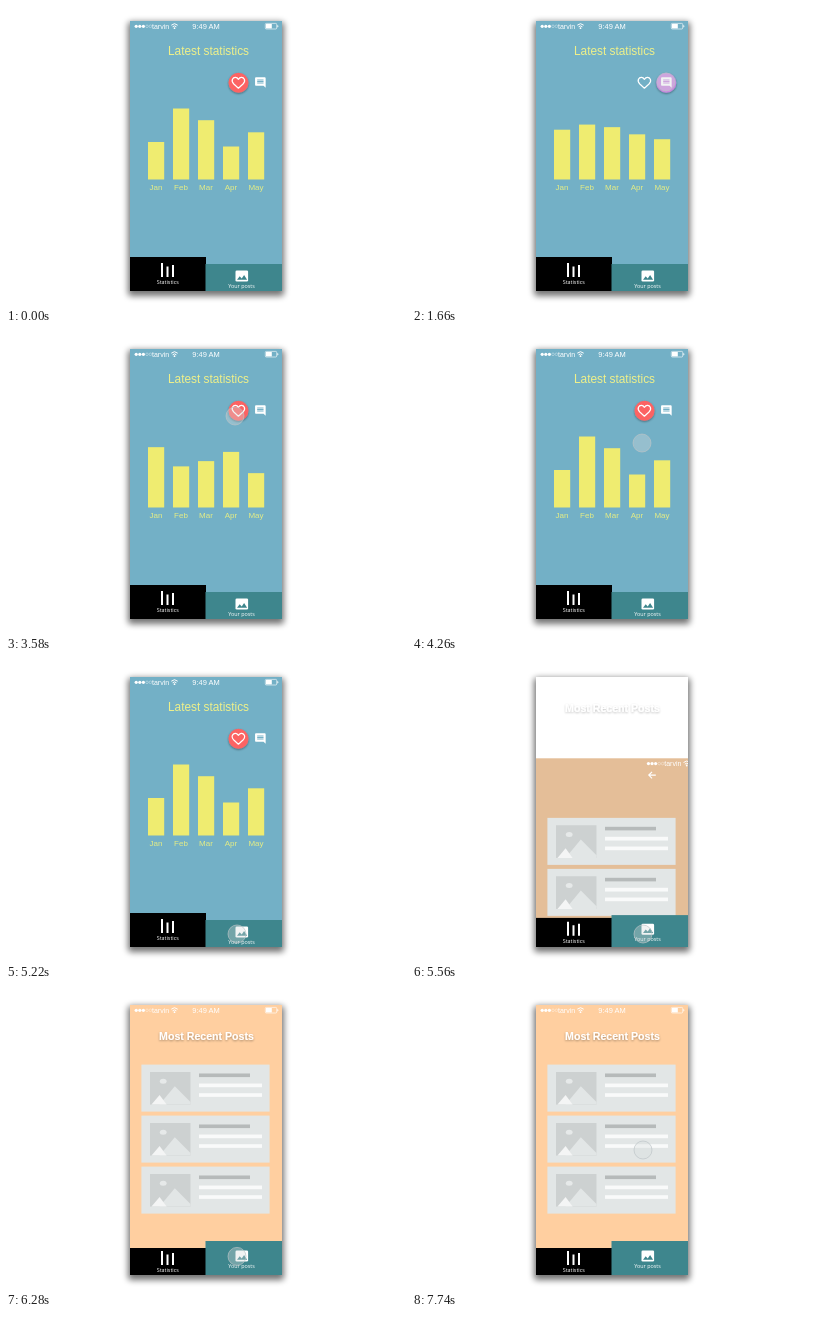
An HTML page for the animation above (8000 ms loop, 400 by 300 pixels).

```html
<!DOCTYPE html>
<html lang="en">
<head>
<meta charset="utf-8">
<title>Statistics app</title>
<style>
  html, body { margin: 0; width: 100%; height: 100%; overflow: hidden; background: #fff; }
  svg { display: block; width: 400px; height: 300px; }
  text { font-family: "Liberation Sans", Arial, sans-serif; }
  .tab text { font: 5.4px "Open Sans", "Noto Sans", sans-serif; fill: #fff; text-anchor: middle; }
  .label { font-size: 8px; fill: #e3ec86; text-anchor: middle; }
  .mid { text-anchor: middle; }
</style>
</head>
<body>
<svg viewBox="0 0 400 300">
  <defs>
    <clipPath id="screen"><rect x="124" y="15" width="152" height="270"/></clipPath>
    <filter id="blur" x="-20%" y="-20%" width="140%" height="140%"><feGaussianBlur stdDeviation="3.4"/></filter>
    <filter id="soft" x="-50%" y="-50%" width="200%" height="200%">
      <feDropShadow dx="0" dy="1" stdDeviation="1" flood-color="#000" flood-opacity=".4"/>
    </filter>

    <g id="status" fill="#fff">
      <circle cx="130.2" cy="20.3" r="1.6"/>
      <circle cx="133.8" cy="20.3" r="1.6"/>
      <circle cx="137.4" cy="20.3" r="1.6"/>
      <g fill="none" stroke="#fff" stroke-width=".5" opacity=".7">
        <circle cx="141" cy="20.3" r="1.3"/>
        <circle cx="144.4" cy="20.3" r="1.3"/>
      </g>
      <text x="146" y="22.7" font-size="7">tarvin</text>
      <g fill="none" stroke="#fff" stroke-width="1">
        <path d="M165.3 19.2q3.2-3 6.4 0M166.6 20.8q1.9-1.8 3.8 0"/>
      </g>
      <circle cx="168.5" cy="22.2" r=".9"/>
      <text x="200" y="22.9" font-size="7.5" class="mid">9:49 AM</text>
      <rect x="259.3" y="17.4" width="11.4" height="5.6" rx="1" fill="none" stroke="#fff" stroke-width=".6"/>
      <rect x="260" y="18" width="5.8" height="4.4"/>
      <path d="M271.4 19v2.4q1-.3 1-1.2t-1-1.2z"/>
    </g>

    <g id="card">
      <rect x="135.4" y="74.6" width="128.2" height="47" fill="#e2e6e6"/>
      <rect x="144" y="82" width="40.5" height="32.6" fill="#cdd1d1"/>
      <ellipse cx="157.2" cy="91.3" rx="3.4" ry="2.5" fill="#e6e9e9"/>
      <path d="M153.5 114.6L168.8 96.2 184.5 112v2.6z" fill="#e2e6e6"/>
      <path d="M145.5 114.6L153.6 105l7 9.6z" fill="#f4f5f5"/>
      <rect x="193" y="83.5" width="51" height="3.6" fill="#b6baba"/>
      <rect x="193" y="93.5" width="63" height="3.7" fill="#f9fafa"/>
      <rect x="193" y="103.2" width="63" height="3.7" fill="#f9fafa"/>
    </g>
  </defs>

  <rect width="400" height="300" fill="#fff"/>
  <rect x="122" y="16" width="156" height="274" rx="3" fill="#000" opacity=".55" filter="url(#blur)"/>

  <g clip-path="url(#screen)">
    <rect x="124" y="15" width="152" height="270" fill="#fff"/>

    <g id="stats">
      <rect x="124" y="15" width="152" height="270" fill="#73b0c6"/>
      <use href="#status"/>
      <text x="202.5" y="49" font-size="11.85" fill="#eef08a" class="mid">Latest statistics</text>
      <g id="chart"></g>
      <circle id="likeDisc" cx="232.5" cy="76.8" r="10" fill="#fc6464" filter="url(#soft)"/>
      <circle id="talkDisc" cx="254.3" cy="76.8" r="10" fill="#c987df" filter="url(#soft)"/>
      <path d="M232.4 82.2L227.8 78C224.3 74.6 227.2 71.2 229.5 71.4 231 71.5 231.8 72.4 232.4 73.3 233 72.4 233.8 71.5 235.3 71.4 237.6 71.2 240.5 74.6 237 78z"
        fill="none" stroke="#fff" stroke-width="1.2" stroke-linejoin="round"/>
      <path transform="translate(248 70.2) scale(.53)" fill="#fff" fill-rule="evenodd"
        d="M22 4c0-1.100-.9-2-2-2H4c-1.100 0-2 .9-2 2v12c0 1.100.9 2 2 2h14l4 4zM18 14H6v-2h12zM18 11H6V9h12zM18 8H6V6h12z"/>
    </g>

    <g id="posts">
      <g id="sheet">
        <rect id="paper" x="124" y="15" width="152" height="270"/>
        <use href="#card"/>
        <use href="#card" y="51"/>
        <use href="#card" y="102"/>
        <g id="header">
          <use href="#status"/>
          <path d="M137.600 31.800H130.600M133.800 28.500L130.500 31.800 133.800 35.100" fill="none" stroke="#fff" stroke-width="1.100"/>
        </g>
      </g>
      <use href="#status"/>
      <text id="title" x="200.5" y="50" font-size="10.6" font-weight="700" fill="#fff" class="mid" filter="url(#soft)">Most Recent Posts</text>
    </g>

    <g id="tabStats" class="tab">
      <rect x="124" y="251" width="76" height="42" fill="#000"/>
    </g>
    <g id="tabPosts" class="tab">
      <rect x="199.5" y="258" width="77" height="42" fill="#3e868d"/>
    </g>
    <g id="statsMark" class="tab">
      <path d="M156 257v14M161.500 260.500v10.500M167 259v12" stroke="#fff" stroke-width="2"/>
      <text x="161.800" y="278">Statistics</text>
    </g>
    <g id="postsMark" class="tab">
      <rect x="229.500" y="264.500" width="12.600" height="11" rx="1.300" fill="#fff"/>
      <path d="M231 273.700l2.700-3.500 2 2.200 2.400-3.300 3 4.600z" fill="#3e868d"/>
      <text x="235.500" y="282">Your posts</text>
    </g>

    <circle id="cursor" r="9" fill="#d8dcdc" fill-opacity=".35" stroke="#bcc3c6" stroke-opacity=".75" stroke-width=".9"/>
  </g>
</svg>

<script>
const LOOP = 8000, FADE = 500, BASE = 173.5;
const TO_TALK = 1430, TO_LIKE = 3420, TO_POSTS = 5255;
const months = ["Jan", "Feb", "Mar", "Apr", "May"];
const likeTops = [136, 102.5, 114.2, 140.5, 126.3];
const talkTops = [107.2, 140.2, 130.5, 112, 142.5];

// start, end, x, y, easing power, optional curve control point
const moves = [
  [640, 1360, 254, 76, 2],
  [2400, 3220, 229, 82, 2, 272, 171],
  [4100, 4500, 235, 242, 5],
  [4800, 5230, 231, 272, 2],
  [6040, 6820, 231, 183, 4.3],
  [7200, 7740, 231, 160, 2]
];

const $ = id => document.getElementById(id);
const mix = (a, b, p) => a + (b - a) * p;
const shift = (id, x, y) => $(id).setAttribute("transform", `translate(${x} ${y})`);
const show = (id, on) => $(id).style.display = on ? "" : "none";

function ease(t, start, end, power = 2) {
  const u = Math.min(1, Math.max(0, (t - start) / (end - start)));
  const half = v => Math.pow(2 * v, power) / 2;
  return u < .5 ? half(u) : 1 - half(1 - u);
}

function add(name, attrs, text = "") {
  const el = document.createElementNS("http://www.w3.org/2000/svg", name);
  for (const key in attrs) el.setAttribute(key, attrs[key]);
  el.textContent = text;
  return $("chart").appendChild(el);
}

const bars = months.map((month, i) => {
  const x = 142 + i * 25;
  add("text", { x: x + 8, y: 184, class: "label" }, month);
  return add("rect", { x, width: 16.2, fill: "#efec70" });
});

function cursorAt(t) {
  let x = 290, y = 140;
  for (const [start, end, toX, toY, power, cx, cy] of moves) {
    if (t < start) break;
    const p = ease(t, start, end, power);
    const bend = (a, c, b) => c === undefined
      ? mix(a, b, p)
      : mix(mix(a, c, p), mix(c, b, p), p);
    x = bend(x, cx, toX);
    y = bend(y, cy, toY);
  }
  return [x, y];
}

function draw(t) {
  const talk = ease(t, TO_TALK, TO_TALK + FADE) - ease(t, TO_LIKE, TO_LIKE + FADE);
  bars.forEach((bar, i) => {
    const top = mix(likeTops[i], talkTops[i], talk);
    bar.setAttribute("y", top);
    bar.setAttribute("height", BASE - top);
  });
  const talking = t >= TO_TALK && t < TO_LIKE;
  show("talkDisc", talking);
  show("likeDisc", !talking);

  const p = ease(t, TO_POSTS, TO_POSTS + FADE);
  show("stats", t < TO_POSTS);
  show("posts", t >= TO_POSTS);
  shift("sheet", 0, 270 * (1 - p));
  shift("header", 152 * p, 0);
  $("paper").setAttribute("fill", `rgb(${mix(165, 255, p)},${mix(150, 207, p)},${mix(133, 160, p)})`);
  $("title").setAttribute("opacity", p);

  shift("tabStats", 0, 7 * p);
  shift("tabPosts", 0, -7 * p);
  shift("statsMark", 0, 4 * p);
  shift("postsMark", 0, -4 * p);
  shift("cursor", ...cursorAt(t));
}

const began = performance.now();
function tick() {
  draw((performance.now() - began) % LOOP);
  requestAnimationFrame(tick);
}
tick();
</script>
</body>
</html>
```
